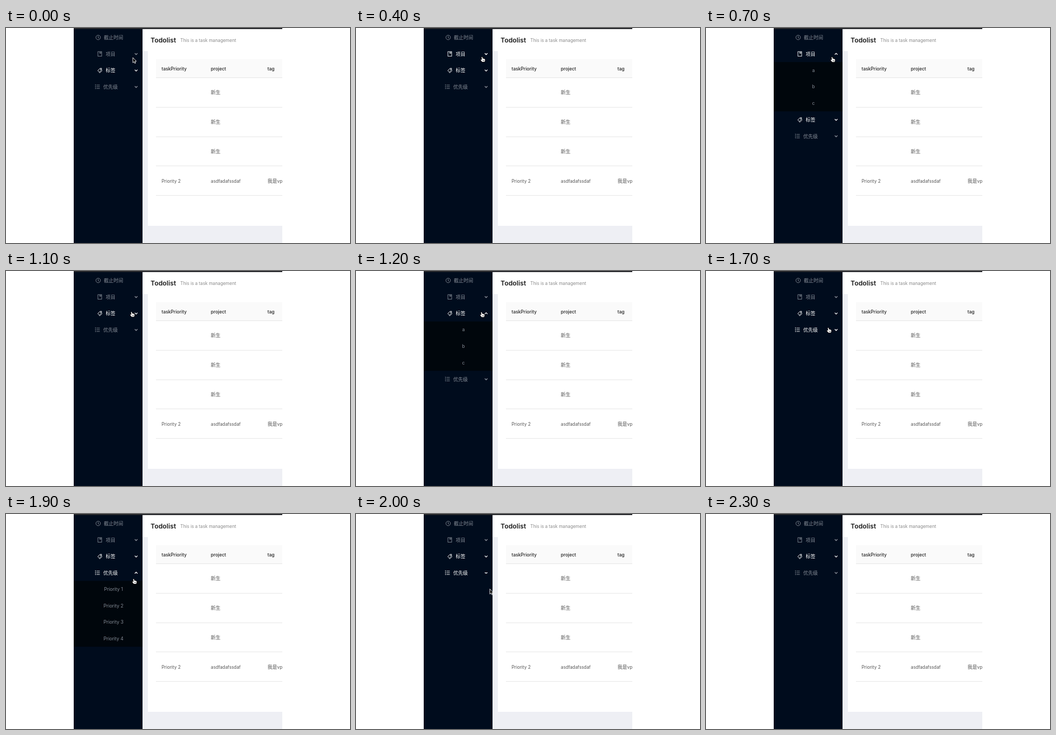
These frames come from a looping animation (640x400 px, 2.4 s). An HTML page with a canvas:

```html
<!DOCTYPE html>
<html lang="zh-CN">
<head>
<meta charset="utf-8">
<title>Todolist</title>
<style>
html, body { margin: 0; width: 100%; height: 100%; overflow: hidden; background: #fff; }
canvas { display: block; }
</style>
</head>
<body>
<canvas id="stage" width="640" height="400"></canvas>
<script>
const ctx = document.getElementById('stage').getContext('2d');
const LOOP = 2400, STEP = 100, PITCH = 30.6;
const LATIN = 'Inter, Roboto, sans-serif';
const CJK = '"Noto Sans CJK SC", "Noto Sans CJK", sans-serif';

const menu = [
  { label: '截止时间', x: 182, icon: clock, iconX: 171.5, items: [] },
  { label: '项目', x: 185.5, icon: book, iconX: 174.5, items: ['a', 'b', 'c'], opens: 600, lit: [100, 800] },
  { label: '标签', x: 185.5, icon: tag, iconX: 174.5, items: ['a', 'b', 'c'], opens: 1200, lit: [0, LOOP] },
  { label: '优先级', x: 181, icon: list, iconX: 170, opens: 1800, lit: [1500, 2000],
    items: ['Priority 1', 'Priority 2', 'Priority 3', 'Priority 4'] }
];

// time, x, y of the pointer
const path = [
  [0, 236, 55], [100, 236, 58], [700, 236, 58.5], [800, 236, 60], [1100, 235, 80.5],
  [1200, 235, 81], [1300, 233, 90], [1400, 231, 99], [1700, 229, 110], [1800, 229, 111],
  [2000, 249, 139.5], [2100, 365, 260], [2200, 495, 376], [2300, 640, 420]
];

function rect(x, y, w, h, color) {
  ctx.fillStyle = color;
  ctx.fillRect(x, y, w, h);
}

function text(str, x, y, size, color, weight = 400, align = 'left') {
  ctx.font = `${weight} ${size}px ${/[\u4e00-\u9fff]/.test(str) ? CJK : LATIN}`;
  ctx.textAlign = align;
  ctx.fillStyle = color;
  ctx.fillText(str, x, y);
}

function line(points, close) {
  ctx.beginPath();
  points.forEach(([x, y], i) => i ? ctx.lineTo(x, y) : ctx.moveTo(x, y));
  if (close) ctx.closePath();
  ctx.stroke();
}

function clock() {
  ctx.beginPath();
  ctx.arc(0, 0, 4.2, 0, Math.PI * 2);
  ctx.stroke();
  line([[0, -2.6], [0, 0.4], [1.9, 1.6]]);
}

function book() {
  ctx.strokeRect(-3.5, -4.2, 7, 8.4);
  line([[0, -4], [0, -0.8], [1.1, -1.6], [2.2, -0.8], [2.2, -4]]);
}

function tag() {
  line([[-3.8, 0.6], [0.2, -3.6], [3.3, -3.9], [3.2, -0.7], [-0.8, 3.2]].concat([[-3.8, 0.6]]), true);
  line([[4.2, -0.2], [4, 0.8], [0, 4.6], [-1.6, 3.4]]);
  ctx.beginPath();
  ctx.arc(1.4, -1.9, 0.6, 0, Math.PI * 2);
  ctx.stroke();
}

function list() {
  for (const y of [-3.2, 0, 3.2]) {
    line([[-1.6, y], [4.5, y]]);
    line([[-4.2, y - 0.9], [-3.4, y - 0.9], [-3.4, y + 0.9]]);
  }
}

function chevron(y, bend, color) {
  ctx.strokeStyle = color;
  ctx.lineWidth = 1.3;
  line([[239.6, y - 1.25 * bend], [242.1, y + 1.25 * bend], [244.6, y - 1.25 * bend]]);
}

function drawTable() {
  rect(126, 0, 388, 400, '#fff');
  rect(254, 43, 10, 325, '#eeeff4');
  rect(254, 368, 260, 32, '#eeeff4');
  text('Todolist', 269, 27, 12.3, '#1c1c1c', 600);
  text('This is a task management', 324.3, 25.6, 8.25, '#8a8a8a');

  rect(279, 58, 235, 34, '#fafafa');
  const cols = [289.5, 381, 486.5];
  ['taskPriority', 'project', 'tag'].forEach((s, i) => text(s, cols[i], 78.6, 8.5, '#222', 500));
  for (let i = 0; i < 5; i++) rect(279, Math.round(92 + i * 54.8), 235, 1, '#e6e6e6');

  const ink = '#555';
  for (let i = 0; i < 3; i++) text('新生', cols[1], 123.3 + i * 55, 9, ink);
  text('Priority 2', cols[0], 287.6, 8.25, ink);
  text('asdfadafssdaf', cols[1], 287.6, 8.25, ink);
  text('我是', cols[2], 288, 9, ink);
  text('vp', cols[2] + 18, 287.6, 8.25, ink);
}

function drawMenu(t) {
  rect(126, 0, 128, 400, '#000c1d');
  let y = 17.4;
  for (const { label, x, icon, iconX, items, opens, lit } of menu) {
    const on = lit && t >= lit[0] && t <= lit[1];
    const color = on ? '#fff' : '#868d97';
    const open = t >= opens && t < opens + 200;

    ctx.save();
    ctx.translate(iconX, y + 0.2);
    ctx.strokeStyle = color;
    ctx.lineWidth = 0.9;
    icon();
    ctx.restore();
    text(label, x, y + 3.6, 9, color);

    // the arrow is still turning one step after the submenu has closed
    if (opens) chevron(y + 0.3, open ? -1 : t === opens + 200 ? 0.35 : 1, color);
    y += PITCH;
    if (!open) continue;
    rect(126, y - PITCH / 2, 128, items.length * PITCH, '#00060c');
    for (const item of items) {
      text(item, 200, y + 3.2, 8.6, '#868d97', 400, 'center');
      y += PITCH;
    }
  }
}

function arrow() {
  const shape = new Path2D('M0 0V9.6L2.2 7.6L3.7 10.8L5.2 10.1L3.8 7H6.6Z');
  ctx.fillStyle = '#000';
  ctx.fill(shape);
  ctx.strokeStyle = '#fff';
  ctx.lineWidth = 0.9;
  ctx.stroke(shape);
}

function hand() {
  const shape = new Path2D('M-2.4 -3.9Q-1.7 -5 -.8 -3.9L-.3 -1.3Q.6 -2 1.3 -1.1Q2.3 -1.5 2.8 -.6' +
    'Q4.1 -.8 4.1 .7V2.2L3.2 4.8H-1.2L-3.8 1.5Q-4 .2 -2.8 .4L-1.7 1.2Z');
  ctx.strokeStyle = '#000';
  ctx.lineWidth = 1.4;
  ctx.stroke(shape);
  ctx.fillStyle = '#fff';
  ctx.fill(shape);
  ctx.lineWidth = 0.5;
  for (const x of [0, 1.3, 2.6]) line([[x, 1.2], [x, 3.4]]);
}

function drawPointer(t) {
  let i = path.length - 1;
  while (path[i][0] > t) i--;
  const a = path[i], b = path[i + 1] || a;
  const k = b === a ? 0 : (t - a[0]) / (b[0] - a[0]);
  ctx.save();
  ctx.translate(a[1] + (b[1] - a[1]) * k, a[2] + (b[2] - a[2]) * k);
  if (t >= 100 && t < 1950) hand();
  else arrow();
  ctx.restore();
}

function draw(t) {
  rect(0, 0, 640, 400, '#fff');
  ctx.save();
  ctx.beginPath();
  ctx.rect(126, 0, 388, 400);
  ctx.clip();
  drawTable();
  drawMenu(t);
  rect(126, 0, 388, 2, '#242529');
  drawPointer(t);
  ctx.restore();
}

const start = performance.now();
function frame() {
  const t = (performance.now() - start) % LOOP;
  draw(Math.floor(t / STEP) * STEP);
  requestAnimationFrame(frame);
}
frame();
</script>
</body>
</html>
```
